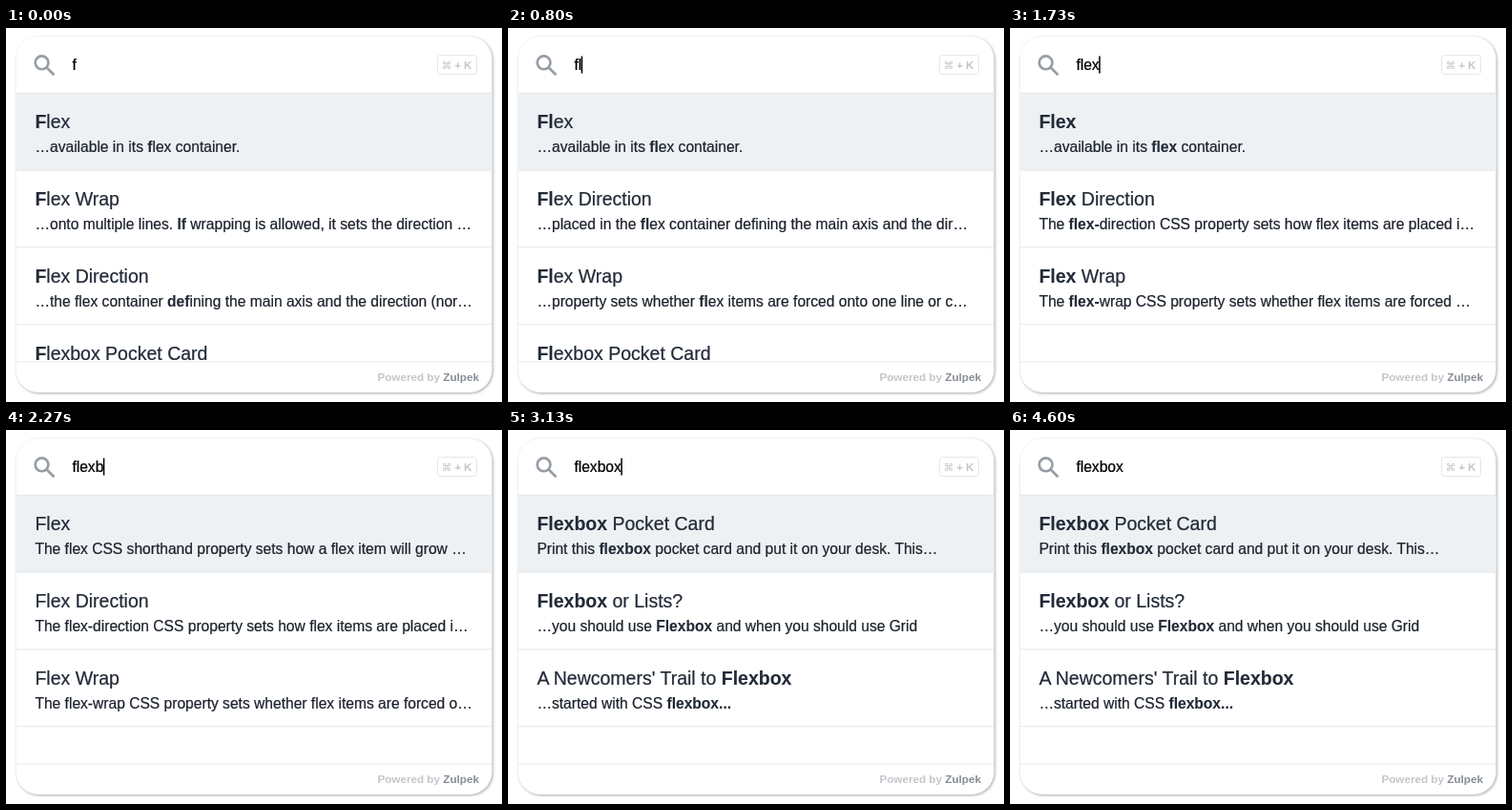
Recreate the animation shown at these times as an HTML page. Size 520 px wide and 392 px high, loop 4670 ms.

```html
<!DOCTYPE html>
<html lang="en">
<head>
<meta charset="utf-8">
<title>Search as you type</title>
<style>
html, body { margin: 0; width: 100%; height: 100%; overflow: hidden; background: #fff; }
svg { display: block; font: 15.6px "Liberation Sans", Arial, sans-serif; }
text { white-space: pre; fill: #1c222c; stroke: #1c222c; stroke-width: .22; }
.title { font-size: 19.5px; fill: #222a37; stroke: #222a37; }
.bold { font-weight: bold; fill: #222a37; stroke-width: .1; }
.small { font-size: 11.7px; font-weight: bold; fill: #c3c6ca; stroke: none; }
.line { stroke: #e4e6e9; fill: none; }
.card { fill: #fff; filter: drop-shadow(1px 1px 1.7px rgba(0, 0, 0, .34)); }
</style>
</head>
<body>
<svg width="520" height="392" viewBox="0 0 520 392">
  <clipPath id="list"><rect x="11" y="69" width="498" height="281"/></clipPath>
  <rect class="card" x="10.5" y="9" width="499" height="373" rx="23.5"/>
  <rect x="10.5" y="68.5" width="499" height="80.5" fill="#edf1f4"/>
  <path class="line" d="M10.5 68.3h499m-499 80.8h499m-499 80.8h499m-499 80.8h499m-499 39.2h499"/>
  <g transform="translate(25.6 24.4) scale(1.257)" fill="none" stroke="#979da5" stroke-width="2.1">
    <circle cx="9.5" cy="9.5" r="5.5"/>
    <path d="M13.4 13.4 19.75 19.75"/>
  </g>
  <text id="query" x="69.4" y="44" style="fill:#000;stroke:#000"></text>
  <rect id="caret" y="29.5" width="1.5" height="18"/>
  <rect class="line" x="452.5" y="28.5" width="41" height="20" rx="3"/>
  <text class="small" x="456.5" y="42.5" style="font:11px 'DejaVu Sans',sans-serif">⌘</text>
  <text class="small" x="470.3" y="42.5">+</text>
  <text class="small" x="480" y="42.5">K</text>
  <g id="rows" clip-path="url(#list)"></g>
  <text class="small" x="389.4" y="370">Powered by <tspan fill="#868c95">Zulpek</tspan></text>
</svg>
<script>
const LOOP = 4670;
const [query, caret, rows] = ['query', 'caret', 'rows'].map(id => document.getElementById(id));

// Asterisks enclose highlighted text; each row is [title, excerpt].
const one = [
  ['*F*lex', '…available in its *f*lex container.'],
  ['*F*lex Wrap', '…onto multiple lines. *If* wrapping is allowed, it sets the direction …'],
  ['*F*lex Direction', '…the flex container *def*ining the main axis and the direction (nor…'],
  ['*F*lexbox Pocket Card', '']
];
const prefix = n => [
  ['Flex', '…available in its flex container.'],
  ['Flex Direction', '…placed in the flex container defining the main axis and the dir…'],
  ['Flex Wrap', '…property sets whether flex items are forced onto one line or c…'],
  ['Flexbox Pocket Card', '']
].map(row => row.map(s => s.replace(/flex/i, m => `*${m.slice(0, n)}*${m.slice(n)}`)));
const exact = [
  ['*Flex*', '…available in its *flex* container.'],
  ['*Flex* Direction', 'The *flex-*direction CSS property sets how flex items are placed i…'],
  ['*Flex* Wrap', 'The *flex-*wrap CSS property sets whether flex items are forced …']
];
const fuzzy = [
  ['Flex', 'The flex CSS shorthand property sets how a flex item will grow …'],
  ['Flex Direction', 'The flex-direction CSS property sets how flex items are placed i…'],
  ['Flex Wrap', 'The flex-wrap CSS property sets whether flex items are forced o…']
];
const box = [
  ['*Flexbox* Pocket Card', 'Print this *flexbox* pocket card and put it on your desk. This…'],
  ['*Flexbox* or Lists?', '…you should use *Flexbox* and when you should use Grid'],
  ["A Newcomers' Trail to *Flexbox*", '…started with CSS *flexbox...*']
];
const plain = list => list.map(row => row.map(s => s.replace(/\*/g, '')));

// [start in ms, letters typed, results]
const steps = [
  [0, 1, one], [800, 2, prefix(2)], [1270, 3, prefix(3)], [1730, 4, exact],
  [2200, 5, exact], [2270, 5, fuzzy], [2670, 6, plain(box)], [3130, 7, box]
];
const caretOff = [[0, 130], [670, 800], [3670, 4130], [4600, LOOP]];

const mark = s => s.replace(/\*(.*?)\*/g, '<tspan class="bold">$1</tspan>');
const row = ([title, excerpt], i) =>
  `<text class="title" x="30.4" y="${105 + i * 81}">${mark(title)}</text>
   <text x="30.4" y="${130 + i * 81}">${mark(excerpt)}</text>`;

let shown;
function draw(now) {
  const t = now % LOOP;
  const step = steps.findLast(s => s[0] <= t);
  if (step !== shown) {
    shown = step;
    query.textContent = 'flexbox'.slice(0, step[1]);
    rows.innerHTML = step[2].map(row).join('');
    caret.setAttribute('x', 68.9 + query.getComputedTextLength());
  }
  const off = caretOff.some(([from, to]) => t >= from && t < to);
  caret.setAttribute('visibility', off ? 'hidden' : 'visible');
}

const start = performance.now();
function frame() {
  draw(performance.now() - start);
  requestAnimationFrame(frame);
}
frame();
</script>
</body>
</html>
```
